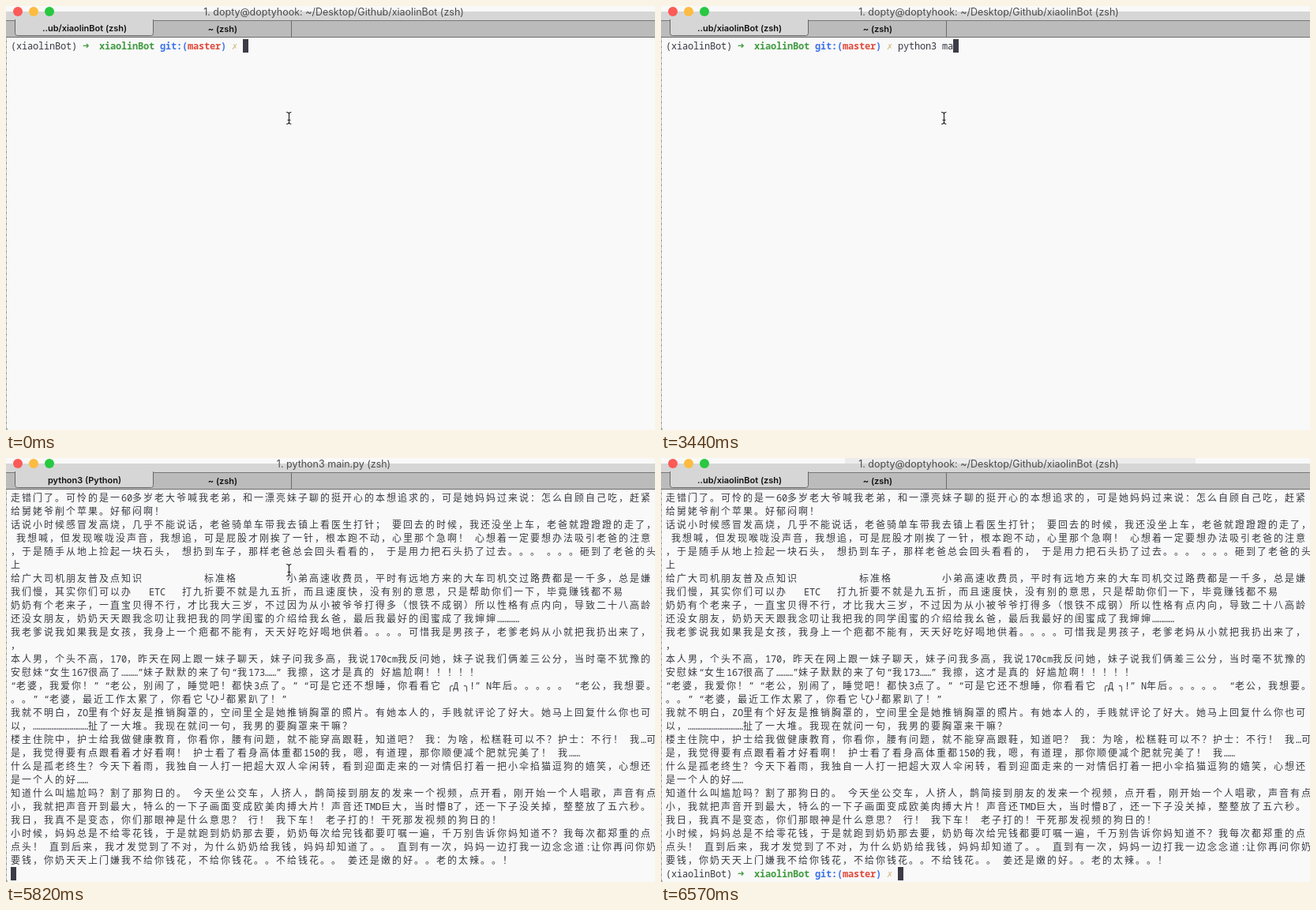
Recreate the animation shown at these times as an HTML page with a canvas. Size 822 by 537 pixels, loop 7.02 s.

```html
<!DOCTYPE html>
<html lang="zh-CN">
<head>
<meta charset="utf-8">
<title>Terminal session</title>
<style>
html, body { margin: 0; width: 100%; height: 100%; overflow: hidden; background: #f9f9f9; }
canvas { display: block; width: 822px; height: 537px; }
</style>
</head>
<body>
<canvas id="stage" width="822" height="537"></canvas>
<script>
const ctx = document.getElementById('stage').getContext('2d');
const LOOP = 7020, W = 822, H = 537;
const LEFT = 6, TOP = 42, CELL = 7, ROW = 17;
const BG = '#f9f9f9', INK = '#383a42', BAR = '#d6d6d6';
const MONO = '"Noto Sans Mono", "DejaVu Sans Mono", monospace';
const SYMBOL = '"DejaVu Sans Mono", monospace';
const HAN = '"Noto Sans CJK SC", "Noto Sans CJK", sans-serif';
const UI = 'Inter, Roboto, sans-serif';

const COMMAND = 'python3 main.py ';
const HOST = '1. dopty@doptyhook: ~/Desktop/Github/xiaolinBot';

const OUTPUT = `走错门了。可怜的是一60多岁老大爷喊我老弟，和一漂亮妹子聊的挺开心的本想追求的，可是她妈妈过来说：怎么自顾自己吃，赶紧
给舅姥爷削个苹果。好郁闷啊！
话说小时候感冒发高烧，几乎不能说话，老爸骑单车带我去镇上看医生打针； 要回去的时候，我还没坐上车，老爸就蹬蹬蹬的走了，
 我想喊，但发现喉咙没声音，我想追，可是屁股才刚挨了一针，根本跑不动，心里那个急啊！ 心想着一定要想办法吸引老爸的注意
，于是随手从地上捡起一块石头， 想扔到车子，那样老爸总会回头看看的， 于是用力把石头扔了过去。。。 。。。砸到了老爸的头
上
给广大司机朋友普及点知识           标准格         小弟高速收费员，平时有远地方来的大车司机交过路费都是一千多，总是嫌
我们慢，其实你们可以办   ETC   打九折要不就是九五折，而且速度快，没有别的意思，只是帮助你们一下，毕竟赚钱都不易
奶奶有个老来子，一直宝贝得不行，才比我大三岁，不过因为从小被爷爷打得多（恨铁不成钢）所以性格有点内向，导致二十八高龄
还没女朋友，奶奶天天跟我念叨让我把我的同学闺蜜的介绍给我幺爸，最后我最好的闺蜜成了我婶婶…………
我老爹说我如果我是女孩，我身上一个疤都不能有，天天好吃好喝地供着。。。。可惜我是男孩子，老爹老妈从小就把我扔出来了，
，
本人男，个头不高，170，昨天在网上跟一妹子聊天，妹子问我多高，我说170cm我反问她，妹子说我们俩差三公分，当时毫不犹豫的
安慰妹“女生167很高了………”妹子默默的来了句“我173……” 我擦，这才是真的 好尴尬啊！！！！！
“老婆，我爱你！” “老公，别闹了，睡觉吧！都快3点了。” “可是它还不想睡，你看看它 ╭Д ╮!” N年后。。。。。 “老公，我想要。
。。” “老婆，最近工作太累了，你看它╰ひ╯都累趴了！”
我就不明白，ZO里有个好友是推销胸罩的，空间里全是她推销胸罩的照片。有她本人的，手贱就评论了好大。她马上回复什么你也可
以，…………………………扯了一大堆。我现在就问一句，我男的要胸罩来干嘛？
楼主住院中，护士给我做健康教育，你看你，腰有问题，就不能穿高跟鞋，知道吧？ 我：为啥，松糕鞋可以不？护士：不行！ 我…可
是，我觉得要有点跟看着才好看啊！ 护士看了看身高体重都150的我，嗯，有道理，那你顺便减个肥就完美了！ 我……
什么是孤老终生？今天下着雨，我独自一人打一把超大双人伞闲转，看到迎面走来的一对情侣打着一把小伞掐猫逗狗的嬉笑，心想还
是一个人的好……
知道什么叫尴尬吗？割了那狗日的。 今天坐公交车，人挤人，鹊简接到朋友的发来一个视频，点开看，刚开始一个人唱歌，声音有点
小，我就把声音开到最大，特么的一下子画面变成欧美肉搏大片！声音还TMD巨大，当时懵B了，还一下子没关掉，整整放了五六秒。
我日，我真不是变态，你们那眼神是什么意思？ 行！ 我下车！ 老子打的！干死那发视频的狗日的！
小时候，妈妈总是不给零花钱，于是就跑到奶奶那去要，奶奶每次给完钱都要叮嘱一遍，千万别告诉你妈知道不？我每次都郑重的点
点头！ 直到后来，我才发觉到了不对，为什么奶奶给我钱，妈妈却知道了。。 直到有一次，妈妈一边打我一边念念道:让你再问你奶
要钱，你奶天天上门嫌我不给你钱花，不给你钱花。。不给钱花。。 姜还是嫩的好。。老的太辣。。！`.split('\n');

// Each table lists [start time, value]; the latest started entry applies.
const TYPED = [[0, 0], [750, 1], [900, 2], [1050, 4], [1190, 5], [1340, 7],
  [1640, 8], [3440, 10], [3590, 11], [3730, 12], [3880, 16]];
const TITLES = [[0, HOST + ' (zsh)'], [5220, '1. python3 main.py (zsh)'],
  [5970, HOST + ' (Python)'], [6570, HOST + ' (zsh)']];
const TABS = [[0, '..ub/xiaolinBot (zsh)'], [5220, 'python3 (zsh)'],
  [5820, 'python3 (Python)'], [5970, '..ub/xiaolinBot (Python)'],
  [6420, '..ub/xiaolinBot (zsh)']];
const POINTER = [[0, [358, 142]], [5970, [402, 299]], [6120, [429, 366]],
  [6270, [656, 487]], [6420, [673, 493]], [6570, null]];

const at = (table, t) => table.findLast(entry => entry[0] <= t)[1];

function box(x, y, w, h, color) {
  ctx.fillStyle = color;
  ctx.fillRect(x, y, w, h);
}

// Writes text on the terminal grid and returns the next free column.
function write(text, col, row, color = INK, bold = false) {
  ctx.fillStyle = color;
  ctx.textAlign = 'left';
  ctx.textBaseline = 'alphabetic';
  const weight = bold ? 'bold ' : '';
  for (const ch of text) {
    const code = ch.codePointAt(0), wide = code >= 0x2e80;
    const symbol = code >= 0x2500 && !wide;
    if (ch !== ' ') {
      ctx.font = weight + '12px ' + (wide ? HAN : symbol ? SYMBOL : MONO);
      ctx.fillText(ch, LEFT + col * CELL, TOP + row * ROW + 13);
    }
    col += wide ? 2 : 1;
  }
  return col;
}

function caret(col, row) {
  box(LEFT + col * CELL, TOP + row * ROW, CELL, ROW, '#3b3c46');
}

function prompt(row) {
  const blue = '#3f73ea', green = '#419b41';
  write('(xiaolinBot)', 0, row);
  ctx.fillStyle = green;
  ctx.font = 'bold 14px ' + SYMBOL;
  ctx.fillText('➜', LEFT + 13 * CELL, TOP + row * ROW + 13);
  write('xiaolinBot', 16, row, green, true);
  write('git:(', 27, row, blue, true);
  write('master', 32, row, '#e04b3c', true);
  write(')', 38, row, blue, true);
  write('✗', 40, row, '#d8bd83', true);
  return 42;
}

function label(text, x, y, font, color) {
  ctx.font = font + ' ' + UI;
  ctx.fillStyle = color;
  ctx.textAlign = 'center';
  ctx.textBaseline = 'alphabetic';
  ctx.fillText(text, x, y);
}

function drawWindow(t) {
  box(0, 0, W, H, BG);
  if (t >= 5220 && t < 5820) box(6, 40, 580, 36, '#f7f7f7');

  box(0, 7, W, 11, BAR);
  if (t >= 6570) box(233, 0, 444, 7, '#ececec');
  ['#fc5b57', '#fdbc40', '#28c840'].forEach((color, i) => {
    ctx.fillStyle = color;
    ctx.beginPath();
    ctx.arc(15 + 20 * i, 7, 6, 0, 7);
    ctx.fill();
  });
  label(at(TITLES, t), 415, 12, '12.5px', '#4b4b4b');

  box(0, 18, W, 22, '#bbbbbb');
  box(0, 18, W, 1, '#777777');
  box(0, 39, W, 1, '#6c6c6c');
  box(361, 18, 1, 21, '#6c6c6c');
  ctx.beginPath();
  ctx.roundRect(11.5, 17.5, 175, 20, [0, 0, 3, 3]);
  ctx.fillStyle = BAR;
  ctx.fill();
  ctx.strokeStyle = '#666666';
  ctx.lineWidth = 1;
  ctx.stroke();
  box(12, 17, 174, 2, BAR);
  label(at(TABS, t), 99.5, 32, '600 11px', '#111111');
  label('~ (zsh)', 274.5, 33, '600 11px', '#111111');

  // Left window edge
  box(0, 40, 1, H - 40, '#c4c4c4');
  for (let y = 44; y < H; y += 7) box(0, y, 1, 2, '#888888');
  box(0, H - 2, 2, 2, '#aaaaaa');
}

function drawPointer([x, y]) {
  ctx.lineCap = 'round';
  for (const [width, color] of [[3, '#ffffff'], [1.2, '#202020']]) {
    ctx.lineWidth = width;
    ctx.strokeStyle = color;
    ctx.beginPath();
    for (const s of [-1, 1]) {
      ctx.moveTo(x - 2.5, y + s * 7.5);
      ctx.quadraticCurveTo(x, y + s * 7.5, x + .5, y + s * 5.5);
      ctx.quadraticCurveTo(x + 1, y + s * 7.5, x + 3, y + s * 7.5);
    }
    ctx.moveTo(x + .5, y - 5.5);
    ctx.lineTo(x + .5, y + 5.5);
    ctx.moveTo(x - 1, y + 2.5);
    ctx.lineTo(x + 2, y + 2.5);
    ctx.stroke();
  }
}

function draw(t) {
  drawWindow(t);
  if (t < 5820) {
    const end = write(COMMAND.slice(0, at(TYPED, t)), prompt(0), 0);
    if (t < 5220) caret(end, 0);
    else caret(0, 1);
  } else {
    OUTPUT.forEach((line, row) => write(line, 0, row));
    caret(t < 5970 ? 0 : prompt(OUTPUT.length), OUTPUT.length);
  }
  const pointer = at(POINTER, t);
  if (pointer) drawPointer(pointer);
}

const start = performance.now();
function tick() {
  draw((performance.now() - start) % LOOP);
  requestAnimationFrame(tick);
}
tick();
</script>
</body>
</html>
```
